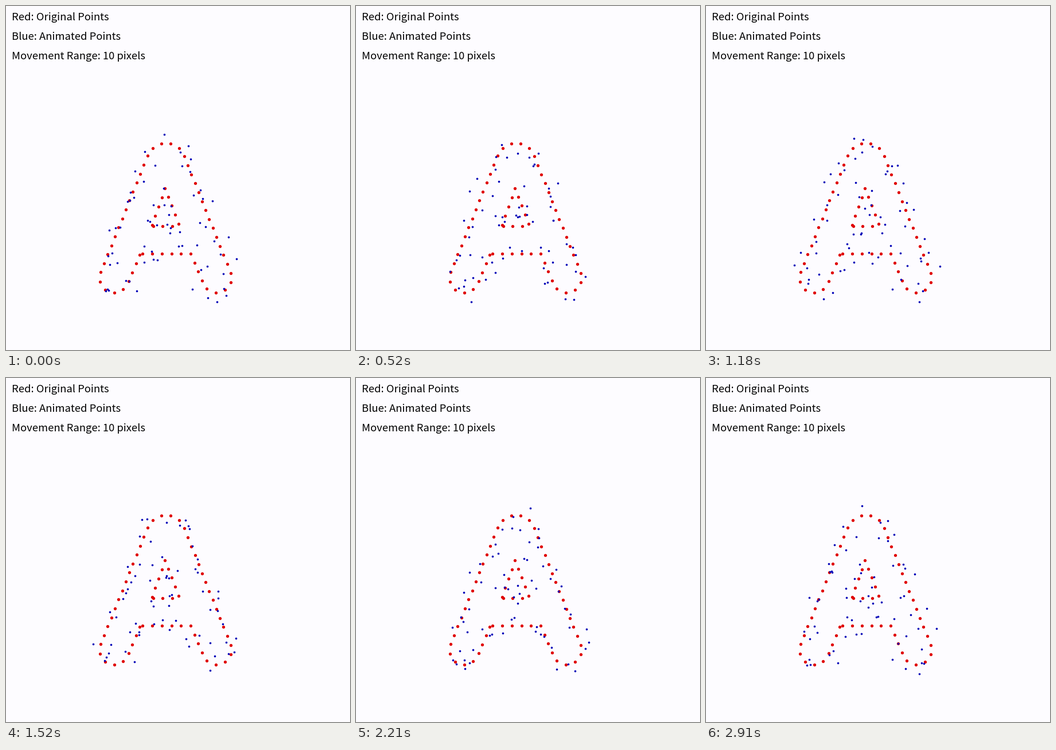
These frames come from a looping animation (600x600 px, 2940 ms). A matplotlib script:

```python
import numpy as np
import matplotlib.pyplot as plt
from matplotlib.animation import FuncAnimation

SIZE, DPI = 600, 100
PX = 72 / DPI
FRAMES, INTERVAL = 98, 30
UNIT = 5 / 3
REACH = 10 * UNIT
SLANT = 22  # lean of the legs in degrees


def arc(cx, cy, r, start, end):
    a = np.radians(np.linspace(start, end, 60))
    return np.column_stack([cx + r * np.cos(a), cy + r * np.sin(a)])


def resample(path, count):
    """Points at equal arc length along a path, both ends included."""
    steps = np.hypot(*np.diff(path, axis=0).T)
    length = np.concatenate([[0], np.cumsum(steps)])
    at = np.linspace(0, length[-1], count)
    return np.column_stack([np.interp(at, length, axis) for axis in path.T])


# Round feet and top joined by straight tangents, then the crossbar.
outer = np.vstack([
    [(233, 433.5)],
    arc(188.5, 474, 25.6, SLANT, 180 + SLANT),
    arc(278.5, 273, 34, 180 + SLANT, 360 - SLANT),
    arc(367.5, 474, 25.6, -SLANT, 180 - SLANT),
    [(322, 432.2), (238, 432)],
])
inner = np.array([(254.5, 381.8), (277.6, 317.6), (302.9, 383.9), (256.5, 384)])
anchors = np.vstack([resample(outer, 53), resample(inner, 12)])

rng = np.random.default_rng(10)
cycles = rng.integers(4, 8, anchors.shape)
phase = rng.uniform(0, 2 * np.pi, anchors.shape)


def wander(t):
    """Blue positions at loop fraction t."""
    return anchors + REACH * np.sin(2 * np.pi * cycles * t + phase)


fig = plt.figure(figsize=(SIZE / DPI, SIZE / DPI), dpi=DPI, facecolor="#fdfcff")
ax = fig.add_axes([0, 0, 1, 1])
ax.set(xlim=(0, SIZE), ylim=(SIZE, 0))
ax.axis("off")

labels = ("Red: Original Points", "Blue: Animated Points", "Movement Range: 10 pixels")
for row, label in enumerate(labels):
    ax.text(9.8, 25.3 + 33.7 * row, label, fontsize=18.4 * PX,
            family="Noto Sans CJK JP", color="black", va="baseline")


def dots(points, diameter, color):
    return ax.scatter(*points.T, s=(diameter * PX) ** 2, c=color, linewidths=0)


dots(anchors, 5.3, "#e00000")
movers = dots(wander(0), 3.6, "#0000b8")


def update(frame):
    movers.set_offsets(wander(frame / FRAMES))
    return (movers,)


anim = FuncAnimation(fig, update, frames=FRAMES, interval=INTERVAL,
                     repeat=True, repeat_delay=0)
plt.show()
```
